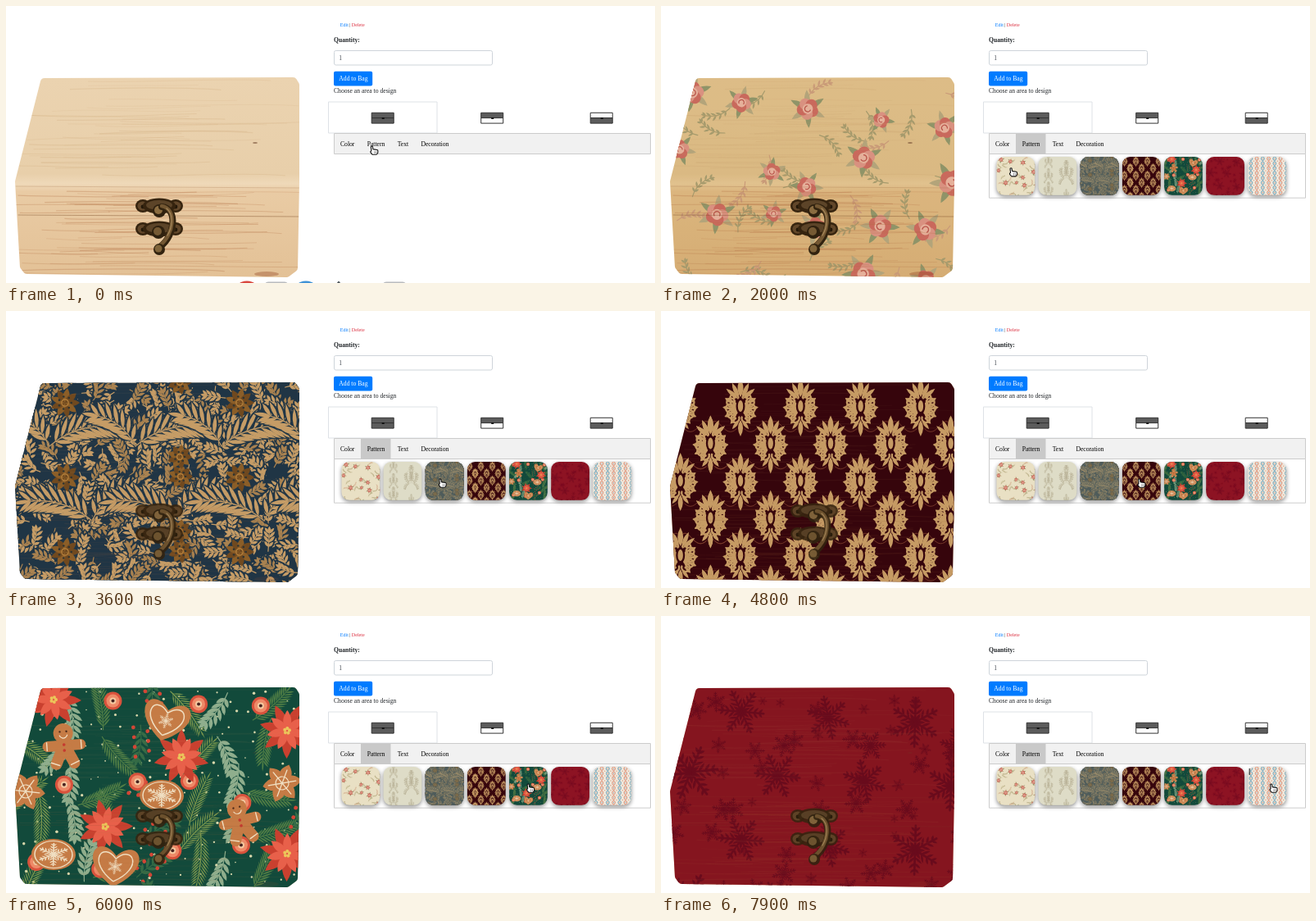
These frames come from a looping animation (792x338 px, 8 s). An HTML page with a canvas:

```html
<!DOCTYPE html>
<html lang="en">
<head>
<meta charset="utf-8">
<title>Box designer</title>
<style>
html, body { margin: 0; width: 100%; height: 100%; overflow: hidden; background: #fff; }
canvas { display: block; width: 792px; height: 338px; }
</style>
</head>
<body>
<canvas id="stage" width="792" height="338"></canvas>
<script>
const W = 792, H = 338, LOOP = 8000, TAU = Math.PI * 2;
const stage = document.getElementById('stage').getContext('2d');

// ---- helpers ----
function layer(draw) {
  const canvas = document.createElement('canvas');
  canvas.width = W; canvas.height = H;
  draw(canvas.getContext('2d'));
  return canvas;
}
function random(seed) {
  return (lo = 0, hi = 1) => {
    seed = seed * 16807 % 2147483647;
    return lo + (hi - lo) * seed / 2147483647;
  };
}
// Calls draw once per cell of a jittered grid covering the box.
function scatter(cell, seed, draw) {
  const rnd = random(seed * 99991);
  let i = 0;
  for (let y = 88; y < H; y += cell)
    for (let x = 8; x < 362; x += cell)
      draw(x + rnd(.15, .85) * cell, y + rnd(.15, .85) * cell, rnd, i++);
}
function lattice(x0, y0, dx, dy, stagger, draw) {
  for (let row = 0, y = y0; y < H + dy; y += dy, row++)
    for (let x = x0 - row % 2 * stagger; x < 365 + dx; x += dx) draw(x, y, row);
}
function at(c, x, y, angle, scale, draw) {
  c.save();
  c.translate(x, y); c.rotate(angle); c.scale(scale, scale);
  draw(c);
  c.restore();
}
function mirror(c, draw) {
  for (const side of [1, -1]) { c.save(); c.scale(side, 1); draw(c); c.restore(); }
}
function spokes(n, draw) {
  for (let i = 0; i < n; i++) draw(i * TAU / n, i);
}
function dot(c, x, y, rx, fill, ry = rx) {
  c.fillStyle = fill;
  c.beginPath(); c.ellipse(x, y, rx, ry, 0, 0, TAU); c.fill();
}
function ring(c, x, y, r, color, width = 1, from = 0, to = TAU) {
  c.strokeStyle = color; c.lineWidth = width;
  c.beginPath(); c.arc(x, y, r, from, to); c.stroke();
}
function curve(c, color, width, x, y, ...bezier) {
  c.strokeStyle = color; c.lineWidth = width; c.lineCap = 'round';
  c.beginPath(); c.moveTo(x, y); c.bezierCurveTo(...bezier); c.stroke();
}
function line(c, color, width, x1, y1, x2, y2) {
  curve(c, color, width, x1, y1, x1, y1, x2, y2, x2, y2);
}
function leaf(c, x, y, angle, length, width, fill) {
  at(c, x, y, angle, 1, () => {
    c.fillStyle = fill;
    c.beginPath(); c.moveTo(0, 0);
    c.quadraticCurveTo(length * .45, -width, length, 0);
    c.quadraticCurveTo(length * .45, width, 0, 0);
    c.fill();
  });
}
function frond(c, x, y, angle, length, bend, n, size, width, color) {
  for (let i = 0; i < n; i++) {
    const u = i / n, a = angle + bend * u, s = size * (.45 + .55 * Math.sin(Math.PI * (.2 + .75 * u)));
    const nx = x + Math.cos(a) * length / n, ny = y + Math.sin(a) * length / n;
    line(c, color, 1.2, x, y, nx, ny);
    leaf(c, nx, ny, a - .7, s, width, color);
    leaf(c, nx, ny, a + .7, s, width, color);
    x = nx; y = ny;
  }
  leaf(c, x, y, angle + bend, size * .8, width, color);
}
function polygon(c, points, radius) {
  const n = points.length, mid = (p, q) => [(p[0] + q[0]) / 2, (p[1] + q[1]) / 2];
  c.beginPath();
  c.moveTo(...mid(points[n - 1], points[0]));
  points.forEach((p, i) => c.arcTo(...p, ...mid(p, points[(i + 1) % n]), radius));
  c.closePath();
}
function text(c, label, x, y, color = '#212529', size = 7.65, weight = '') {
  c.font = `${weight} ${size}px "Liberation Serif", serif`;
  c.fillStyle = color;
  c.fillText(label, x, y);
  return c.measureText(label).width;
}
function panel(c, x, y, w, h, fill, stroke, r = 0) {
  c.beginPath(); c.roundRect(x, y, w, h, r);
  if (fill) { c.fillStyle = fill; c.fill(); }
  if (stroke) { c.strokeStyle = stroke; c.lineWidth = 1; c.stroke(); }
}

// ---- patterns ----
function rose(c) {
  spokes(6, (a, i) => leaf(c, 0, 0, a, 26, 8, i % 2 ? '#8f9468' : '#b3a47a'));
  spokes(5, (a, i) => dot(c, Math.cos(a) * 7, Math.sin(a) * 7, 8, i % 2 ? '#d99180' : '#c9695c'));
  dot(c, 0, 0, 7, '#e5b09a');
  ring(c, 0, 0, 4, '#b9554b', 1.5, 0, 4);
}
function roses(c) {
  scatter(52, 31, (x, y, rnd, i) =>
    frond(c, x, y, rnd(0, TAU), 32, 1, 5, 8, 2.5, i % 3 ? '#a59a6c' : '#c99a78'));
  scatter(72, 12, (x, y, rnd) => at(c, x, y, rnd(0, TAU), rnd(.65, 1.1), rose));
}
function scrolls(c) {
  const ink = '#948764';
  const ornament = () => {
    mirror(c, () => {
      frond(c, 0, 40, -1.2, 62, -1, 6, 17, 8, ink);
      frond(c, 4, 42, -.4, 62, -1.5, 6, 18, 8, ink);
      frond(c, 6, 46, .2, 48, 1.3, 5, 17, 7, ink);
      frond(c, 2, -24, -1.1, 40, -1, 5, 13, 6, ink);
      ring(c, 30, -8, 13, ink, 3, -2.5, 2);
      for (let i = 0; i < 6; i++) dot(c, 16 + i * 6, -34 + i * i * 1.2, 2, ink);
    });
    dot(c, 0, 8, 7, ink, 13);
    leaf(c, 0, -40, -Math.PI / 2, 24, 9, ink);
  };
  c.globalAlpha *= .8;
  at(c, 188, 180, 0, 1, () => {
    ornament();
    mirror(c, () => {
      for (let row = 0; row < 3; row++) at(c, 114, row * 92 - 68, 0, .55 + row * .07, ornament);
    });
  });
  at(c, 188, 322, 0, .4, ornament);
}
function acanthus(c) {
  const navy = '#203545', tan = '#c59c66';
  const outlined = (x, y, a, length, bend, n, size, width, color) => {
    frond(c, x, y, a, length, bend, n, size + 2, width + 4, navy);
    frond(c, x, y, a, length, bend, n, size, width, color);
  };
  scatter(15, 77, (x, y, rnd, i) =>
    outlined(x, y, rnd(0, TAU), 22, rnd(-1, 1), 4, 11, 3.6, i % 3 ? tan : '#a98250'));
  lattice(105, 165, 105, 91, 52, (x, y, row) => {
    const side = row % 2 ? 1 : -1;
    outlined(x, y - 91, -Math.PI / 2 + side * .9, 80, side * .8, 9, 30, 5, tan);
    outlined(x, y - 91, -Math.PI / 2 - side * .5, 60, -side * .9, 7, 26, 5, tan);
  });
  lattice(72, 112, 213, 91, 0, (x, y) => {
    for (const [dx, dy, r] of [[0, 0, 14], [-72, 90, 11], [140, -25, 11]]) at(c, x + dx, y + dy, 0, 1, () => {
      dot(c, 0, 0, r + 2, navy);
      spokes(9, (a, i) => leaf(c, 0, 0, a, r + 4, 8, i % 2 ? '#8b5e28' : '#70491f'));
      spokes(7, a => dot(c, Math.cos(a) * r * .55, Math.sin(a) * r * .55, 1.3, '#2f3330'));
      ring(c, 0, 0, r * .3, '#b5803c', 1.2);
    });
  });
}
function damask(c) {
  const gold = '#c69b64', dark = '#36050c';
  const medallion = () => {
    mirror(c, () => {
      curve(c, '#7a3b2b', .9, 5, 30, 20, 44, 26, 10, 36, 24);
      for (let i = 0; i < 5; i++) {
        const a = -.95 + i * .5, x = 13 * Math.cos(a), y = 4 + 15 * Math.sin(a);
        ring(c, x, y, 5, gold, 2.3, a - 2.4, a + 2.4);
        dot(c, x, y, 1.7, gold);
        leaf(c, 3, 5, a, 12, 5, gold);
        leaf(c, x, y, a - .2, 9, 4, gold);
      }
      leaf(c, 2, -8, -1.15, 20, 5.5, gold);
      leaf(c, 3, -7, -.7, 19, 5, gold);
      leaf(c, 2, 20, .9, 13, 4, gold);
    });
    leaf(c, 0, -9, -Math.PI / 2, 23, 7, gold);
    leaf(c, 0, 19, Math.PI / 2, 20, 6, gold);
    dot(c, 0, 2, 5.5, dark, 10);
    dot(c, 0, 2, 3.2, gold, 7);
  };
  lattice(97, 114, 73.3, 45.5, 36.6, (x, y) => {
    at(c, x, y, 0, 1, medallion);
    if (x < 170) at(c, x - 73.3, y, 0, 1, medallion);
  });
}
function snowflake(c, r, color) {
  spokes(6, angle => at(c, 0, 0, angle + TAU / 12, r, () => {
    line(c, color, .09, 0, 0, 1, 0);
    for (let u = .3; u < .9; u += .24) {
      leaf(c, u, 0, .85, .48 - u * .3, .1, color);
      leaf(c, u, 0, -.85, .48 - u * .3, .1, color);
    }
    leaf(c, 0, 0, TAU / 12, .42, .13, color);
  }));
}
function snow(c) {
  const ink = '#690b1c', flake = (x, y, r) => at(c, x, y, x, 1, () => snowflake(c, r, ink));
  scatter(42, 23, (x, y, rnd) => flake(x, y, rnd(4, 14)));
  lattice(98, 122, 106, 78, 62, (x, y, row) => {
    flake(x, y + 9 * Math.sin(x), 34 + 8 * Math.cos(x));
    flake(x + 52, y + 36, 17 + 5 * Math.sin(x + row));
  });
}
const biscuit = '#c57b45', icing = '#f0dfc2';
function heartPath(c, s) {
  c.beginPath(); c.moveTo(0, 22 * s);
  c.bezierCurveTo(-44 * s, -4 * s, -22 * s, -36 * s, 0, -12 * s);
  c.bezierCurveTo(22 * s, -36 * s, 44 * s, -4 * s, 0, 22 * s);
}
function heart(c) {
  c.fillStyle = biscuit; heartPath(c, 1.12); c.fill();
  c.strokeStyle = icing; c.lineWidth = 1.5; heartPath(c, .82); c.stroke();
  snowflake(c, 9, icing);
}
function roundCookie(c) {
  dot(c, 0, 0, 27, biscuit, 19);
  c.scale(1, .72);
  ring(c, 0, 0, 23, icing, 1.5);
  snowflake(c, 19, icing);
}
function starCookie(c) {
  spokes(6, a => leaf(c, 0, 0, a, 24, 15, biscuit));
  spokes(6, a => line(c, icing, 1.3, 0, 0, 17 * Math.cos(a), 17 * Math.sin(a)));
  ring(c, 0, 0, 8, icing, 1.2);
}
function gingerbread(c) {
  line(c, biscuit, 13, -20, -2, 20, -2);
  mirror(c, () => {
    line(c, biscuit, 14, 3, 3, 11, 20);
    line(c, icing, 1.4, 21, -7, 21, 3);
    line(c, icing, 1.4, 7, 22, 17, 18);
  });
  dot(c, 0, 3, 11, biscuit);
  dot(c, 0, -17, 12, biscuit);
  mirror(c, () => dot(c, 4, -19, 1.2, '#4b2a1b'));
  ring(c, 0, -16, 5, '#f3e3c9', 1.2, .3, 2.8);
  dot(c, 0, -3, 1.8, '#c53a30'); dot(c, 0, 4, 1.8, '#c53a30');
}
function poinsettia(c) {
  spokes(7, a => leaf(c, 0, 0, a, 34, 12, '#c9402f'));
  spokes(7, a => leaf(c, 0, 0, a + .45, 25, 10, '#e8604a'));
  spokes(5, a => dot(c, 3 * Math.cos(a), 3 * Math.sin(a), 2, '#ecc65a'));
}
function berry(c) {
  dot(c, 0, 0, 11, '#d9523c'); dot(c, 0, 0, 8, '#ee8a68');
  dot(c, 0, 0, 4, '#f4c9a0'); dot(c, 0, 0, 2, '#4a2320');
}
function redBerries(c) {
  frond(c, -20, 0, 0, 40, .4, 5, 15, 4, '#346b46');
  for (let i = 0; i < 7; i++) dot(c, -18 + i * 6, i % 2 ? -8 : 9, 2.4, '#d34535');
}
function festive(c) {
  const greenery = [
    () => frond(c, -30, 0, -.15, 58, .3, 15, 17, 1.5, '#7d9a4e'),
    () => frond(c, -24, 0, 0, 44, .5, 6, 16, 5, '#8fae8d'),
    () => frond(c, -28, 0, 0, 52, -.3, 13, 17, 2, '#4f7d45'),
    redBerries,
  ];
  scatter(20, 9, (x, y, rnd) => dot(c, x, y, rnd(.7, 1.8), '#d9d8ac'));
  scatter(49, 4, (x, y, rnd, i) => at(c, x, y, rnd(-2, 2), 1, greenery[i % 4]));
  scatter(84, 17, (x, y) => at(c, x, y, 0, 1, berry));
  const heroes = [
    [poinsettia, [214, 172], [121, 257], [58, 102], [343, 140], [343, 290]],
    [heart, [195, 128], [133, 306]],
    [roundCookie, [190, 219], [58, 291]],
    [starCookie, [24, 214], [337, 204]],
    [gingerbread, [71, 160], [286, 252]],
  ];
  for (const [draw, ...places] of heroes)
    for (const [x, y] of places) at(c, x, y, .25 * Math.cos(x), 1, draw);
}
function diamonds(c) {
  for (let col = 0; col < 7; col++) for (let row = 0; row < 9; row++)
    at(c, 28 + col * 38, 100 + row * 31, 0, 1, () => {
      leaf(c, 0, -17, Math.PI / 2, 34, 26, col % 2 ? '#e0a08a' : '#86b0c0');
      leaf(c, 0, -9, Math.PI / 2, 18, 13, '#f4ecdf');
      dot(c, 0, 0, 3, col % 2 ? '#6fa5bd' : '#d9825f');
      dot(c, 19, 15, 4, '#d9a58f');
    });
}
const patterns = [
  { swatch: '#e9e0c4', tint: '#f0e4c4', draw: roses },
  { swatch: '#e0dec8', tint: '#e5dbbd', draw: scrolls, veil: 'rgba(222,220,200,.5)' },
  { swatch: '#203545', draw: acanthus, veil: 'rgba(125,130,112,.5)' },
  { swatch: '#36050c', draw: damask },
  { swatch: '#124a3b', draw: festive },
  { swatch: '#85151f', draw: snow, veil: 'rgba(170,10,50,.2)' },
  { swatch: '#f1e9dc', draw: diamonds },
];

// ---- wooden box ----
const outline = [[43, 88], [353, 87], [358, 95], [358, 215], [356, 322], [344, 331], [23, 327], [17, 319], [11, 214]];
function grain(c) {
  const rnd = random(5);
  const streak = (y, color, sway) => {
    const x = rnd(5, 150), end = x + rnd(90, 260);
    curve(c, color, rnd(.5, 1.3), x, y, x + 60, y + rnd(-sway, sway), end - 50, y + rnd(-sway, sway), end, y + rnd(-2, 2));
  };
  for (let i = 0; i < 34; i++) streak(rnd(92, 212), 'rgba(196,154,106,.2)', 5);
  for (let i = 0; i < 44; i++) streak(rnd(224, 326), 'rgba(176,110,66,.3)', 4);
  line(c, 'rgba(125,78,44,.45)', 1, 15, 255, 357, 257);
  line(c, 'rgba(150,100,60,.25)', 1, 12, 220, 358, 222);
  dot(c, 304, 167, 3, 'rgba(110,70,45,.6)', 1);
  dot(c, 318, 327, 15, 'rgba(150,75,40,.4)', 3);
}
function latch(c) {
  for (const y of [244, 272]) {
    at(c, 187, y, 0, 1, () => mirror(c, () => {
      dot(c, 20, 0, 9, '#36240f', 8);
      dot(c, 20, 0, 6.5, '#62472a', 5.5);
      dot(c, 20, 1, 2.4, '#231809');
    }));
    dot(c, 187, y, 20, '#36240f', 9.5);
    dot(c, 187, y - 1, 16, '#5c4428', 6);
  }
  dot(c, 187, 250, 8, '#2f210f'); dot(c, 186, 249, 5, '#8a6c40');
  dot(c, 186, 276, 8, '#2f210f'); dot(c, 185, 275, 5, '#765a34');
  curve(c, '#32230f', 8, 190, 245, 210, 247, 206, 280, 189, 293);
  curve(c, '#735732', 4.5, 190, 244, 209, 247, 205, 279, 188, 292);
  curve(c, '#a5875a', 1.2, 196, 247, 205, 254, 203, 270, 197, 280);
  dot(c, 187, 297, 7, '#32230f'); dot(c, 186, 296, 4.5, '#80643a');
}
function box(pattern) {
  return layer(c => {
    polygon(c, outline, 5);
    c.clip();
    const wood = c.createLinearGradient(0, 88, 0, 331);
    wood.addColorStop(0, '#ebd3b0');
    wood.addColorStop(.48, '#e8cfaa');
    wood.addColorStop(.53, '#efd9b9');
    wood.addColorStop(.57, '#e9cba4');
    wood.addColorStop(1, '#e3c196');
    c.fillStyle = wood; c.fillRect(0, 80, 365, 258);
    if (pattern) {
      c.save();
      if (pattern.tint) c.globalCompositeOperation = 'multiply';
      c.fillStyle = pattern.tint || pattern.swatch;
      c.fillRect(0, 80, 365, 258);
      c.restore(); c.save();
      pattern.draw(c);
      c.restore();
      c.globalAlpha = pattern.tint ? 1 : .3;
    }
    grain(c);
    c.globalAlpha = pattern && !pattern.tint ? .88 : 1;
    latch(c);
  });
}
const boxes = [null, ...patterns.slice(0, 6)].map(box);

// ---- page ----
const page = layer(c => {
  text(c, 'Edit', 407.7, 25.2, '#007bff', 6.1);
  text(c, '|', 419, 25.2, '#212529', 6.1);
  text(c, 'Delete', 421.8, 25.2, '#dc3545', 6.1);
  text(c, 'Quantity:', 400, 43.8, '#212529', 7.65, 'bold');
  panel(c, 400.5, 54.5, 193, 17.5, '#fff', '#ced4da', 2);
  text(c, '1', 406.3, 65.6, '#495057');
  panel(c, 400, 79.7, 47.2, 17.8, '#007bff', null, 2);
  text(c, 'Add to Bag', 406.3, 91.2, '#fff');
  text(c, 'Choose an area to design', 400, 106.1);
  panel(c, 393.5, 117, 132.5, 38, null, '#dee2e6');
  for (let i = 0; i < 3; i++) {
    const x = 446.2 + i * 133.5;
    panel(c, x, 130.3, 27, 6.3, i < 2 ? '#5c5c5c' : '#fff', '#333');
    panel(c, x, 136.6, 27, 6.5, i % 2 ? '#fff' : '#5c5c5c', '#333');
    panel(c, x + 12.5, 136, 3, 2, '#111');
  }
});
const tileX = i => 409.5 + i * 51.15, TILE_Y = 184, TILE = 46.7;
function tabBar(c, open) {
  panel(c, 400.5, 155.5, 386, 25, '#f1f1f1', '#ccc');
  if (open) panel(c, 433, 156, 36.5, 24.5, '#c9c9c9');
  let x = 408;
  for (const label of ['Color', 'Pattern', 'Text', 'Decoration']) x += text(c, label, x, 171, '#000') + 15.3;
}
const bar = layer(c => tabBar(c, false));
const drawer = layer(c => {
  panel(c, 400.5, 180.5, 386, 53.7, '#fff', '#ccc');
  tabBar(c, true);
  patterns.forEach((p, i) => {
    const x = tileX(i), scale = TILE / 245;
    c.save();
    c.shadowColor = 'rgba(0,0,0,.45)'; c.shadowBlur = 5; c.shadowOffsetY = 2;
    panel(c, x, TILE_Y, TILE, TILE, p.swatch, null, 9.6);
    c.restore(); c.save();
    c.beginPath(); c.roundRect(x, TILE_Y, TILE, TILE, 9.6); c.clip();
    at(c, x - 10 * scale, TILE_Y - 88 * scale, 0, scale, p.draw);
    if (p.veil) { c.fillStyle = p.veil; c.fillRect(x, TILE_Y, TILE, TILE); }
    c.restore();
  });
});
function dock(c, drop) {
  ['#d9473f', '#b9bbbe', '#3f92d6', '#4b5358', '', '#b9bbbe'].forEach((color, i) => {
    const x = 294 + i * 36, y = 335.5 + drop;
    if (!color) return;
    if (i === 3) leaf(c, x + 4, y, Math.PI / 2, 20, 9, color);
    else if (i % 2) panel(c, x - 14, y + 1, 28, 20, color, null, 4);
    else dot(c, x, y + 17, 17, color);
  });
}
function hand(c) {
  polygon(c, [[-3.8, -5], [-1.6, -5], [-1.2, -1.2], [4.8, -.4], [4.8, 3], [3.4, 5.2], [-2, 5.2], [-5, 1.4], [-3, 1]], 1);
  c.fillStyle = '#fff'; c.fill();
  c.strokeStyle = '#111'; c.lineWidth = 1.1; c.stroke();
  line(c, '#333', .6, .8, 1.5, .8, 3.5);
  line(c, '#333', .6, 2.7, 1.5, 2.7, 3.5);
}

// ---- timeline: the first click opens the tab, each later one applies a swatch ----
const clicks = [1100, 1900, 2700, 3600, 4800, 6000, 7100], TRAVEL = 550;

// Step 0 rests on the tab, step n on swatch n - 1.
const restingPlace = step => step ? [371.3 + step * 53.7, step > 1 ? 210 : 202] : [449, 176];
function pointer(t, step) {
  const [x1, y1] = restingPlace(step);
  if (!step) return [x1, y1];
  const [x0, y0] = restingPlace(step - 1);
  const u = Math.min(1, (t - clicks[step - 1]) / TRAVEL), e = u * u * (3 - 2 * u);
  return [x0 + (x1 - x0) * e, y0 + (y1 - y0) * e];
}
function render(t) {
  const c = stage, step = clicks.filter(time => t >= time).length;
  c.fillStyle = '#fff'; c.fillRect(0, 0, W, H);
  c.drawImage(boxes[Math.max(0, step - 1)], 0, 0);
  c.drawImage(page, 0, 0);
  c.drawImage(step ? drawer : bar, 0, 0);
  if (t < 500) dock(c, t / 120);
  if (step && t - clicks[step - 1] >= 500) panel(c, tileX(step - 1) + 1.3, 186, 1, 8, '#222');
  at(c, ...pointer(t, step), 0, 1, hand);
}
function tick(now) {
  render(Math.floor(now % LOOP / 100) * 100);
  requestAnimationFrame(tick);
}
render(0);
requestAnimationFrame(tick);
</script>
</body>
</html>
```
